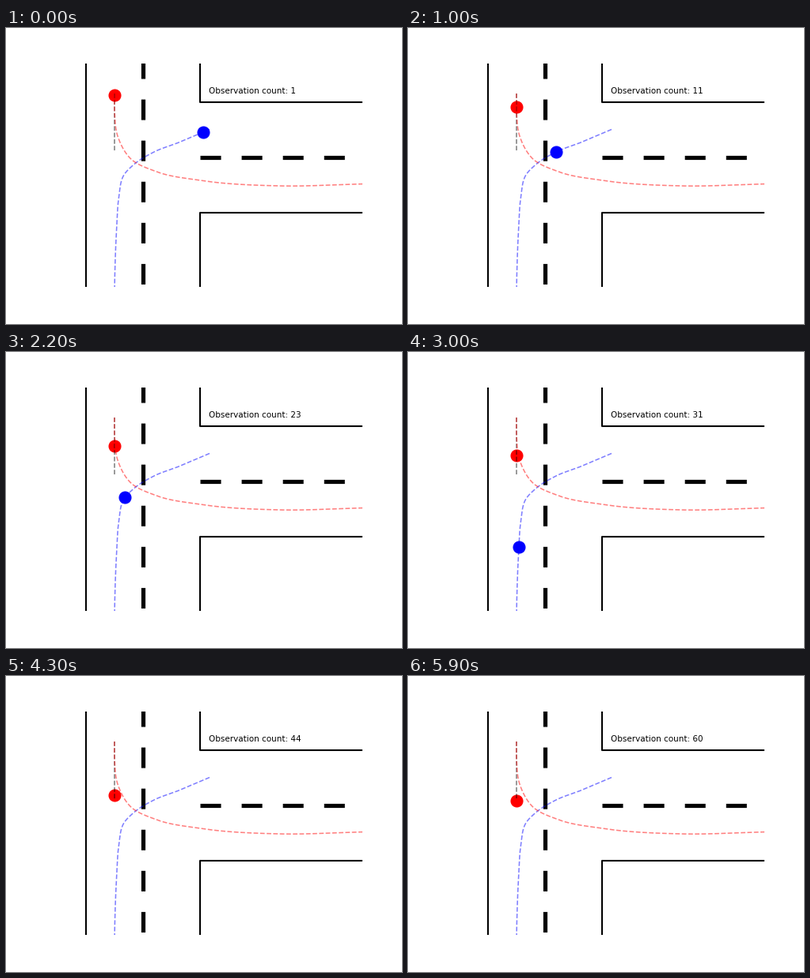
A matplotlib script for the animation above (6000 ms loop, 500x375 px).

```python
import numpy as np
import matplotlib.pyplot as plt
from matplotlib.animation import FuncAnimation

DPI = 75
WIDTH, HEIGHT = 500, 375
FRAMES, INTERVAL = 60, 100
LEFT, RIGHT, TOP, BOTTOM = 62.5, 450, 45, 328
BRAKE_FRAMES = 21


def smooth_path(points, samples=600):
    """Cubic curve through a few points: x, y and distance travelled."""
    pts = np.array(points, float)
    knots = np.r_[0, np.cumsum(np.hypot(*np.diff(pts, axis=0).T))]
    slope = np.gradient(pts, knots, axis=0)
    s = np.linspace(0, knots[-1], samples)
    i = np.clip(np.searchsorted(knots, s) - 1, 0, len(knots) - 2)
    h = (knots[i + 1] - knots[i])[:, None]
    t = (s - knots[i])[:, None] / h
    x, y = ((2 * t**3 - 3 * t**2 + 1) * pts[i]
            + (t**3 - 2 * t**2 + t) * h * slope[i]
            + (3 * t**2 - 2 * t**3) * pts[i + 1]
            + (t**3 - t**2) * h * slope[i + 1]).T
    return x, y, np.r_[0, np.cumsum(np.hypot(np.diff(x), np.diff(y)))]


turn_in = smooth_path([(257, 128.5), (220, 144.3), (187, 157), (161, 173.3),
                       (149, 186), (142.4, 215), (139.9, 250), (137.1, 328),
                       (136.8, 354)])
turn_out = smooth_path([(136.9, 83), (137, 105), (141, 137), (157, 165.2),
                        (190, 182), (245, 193), (345, 200), (450, 197.6)])

fig = plt.figure(figsize=(WIDTH / DPI, HEIGHT / DPI), dpi=DPI,
                 facecolor="white")
ax = fig.add_axes([LEFT / WIDTH, 1 - BOTTOM / HEIGHT,
                   (RIGHT - LEFT) / WIDTH, (BOTTOM - TOP) / HEIGHT])
ax.set_xlim(LEFT, RIGHT)
ax.set_ylim(BOTTOM, TOP)
ax.axis("off")


def make_dot(color):
    return ax.plot([], [], "o", color=color, markersize=14.4, zorder=1)[0]


def dashed(x, y, color):
    ax.plot(x, y, "--", color=color, lw=1.5, alpha=0.5)


red_dot, blue_dot = make_dot("red"), make_dot("blue")

# Road edges
ax.plot([101, 101], [40, 335], color="black", lw=2)
for outer, edge in [(40, 94), (335, 234)]:
    ax.plot([245, 245, 460], [outer, edge, edge], color="black", lw=2)

# Centre lines
for x, y in [((172.7, 172.7), (38, 335)), ((245, 460), (163.7, 163.7))]:
    ax.plot(x, y, color="black", lw=5, dashes=(5, 5))

# Possible paths: stop, turn in, turn out
dashed([136.9, 136.9], [83, 157], "black")
dashed(*turn_in[:2], "blue")
dashed(*turn_out[:2], "red")

label = ax.text(255.8, 83, "", fontsize=10, family="DejaVu Sans",
                va="baseline")


def blue_distance(n):
    """Brake into the corner, then speed up out of it."""
    brake = 1 - (1 - min(n / BRAKE_FRAMES, 1)) ** 1.4
    return 9 + 111.5 * brake + max(n - BRAKE_FRAMES, 0) ** 1.9


def update(n):
    red_dot.set_data([137], [min(85.2 + 1.52 * n, 158)])
    x, y, dist = turn_in
    d = blue_distance(n)
    blue_dot.set_data([np.interp(d, dist, x)], [np.interp(d, dist, y)])
    label.set_text(f"Observation count: {n + 1}")
    return red_dot, blue_dot, label


anim = FuncAnimation(fig, update, frames=FRAMES, interval=INTERVAL,
                     repeat=True, repeat_delay=0)
plt.show()
```
